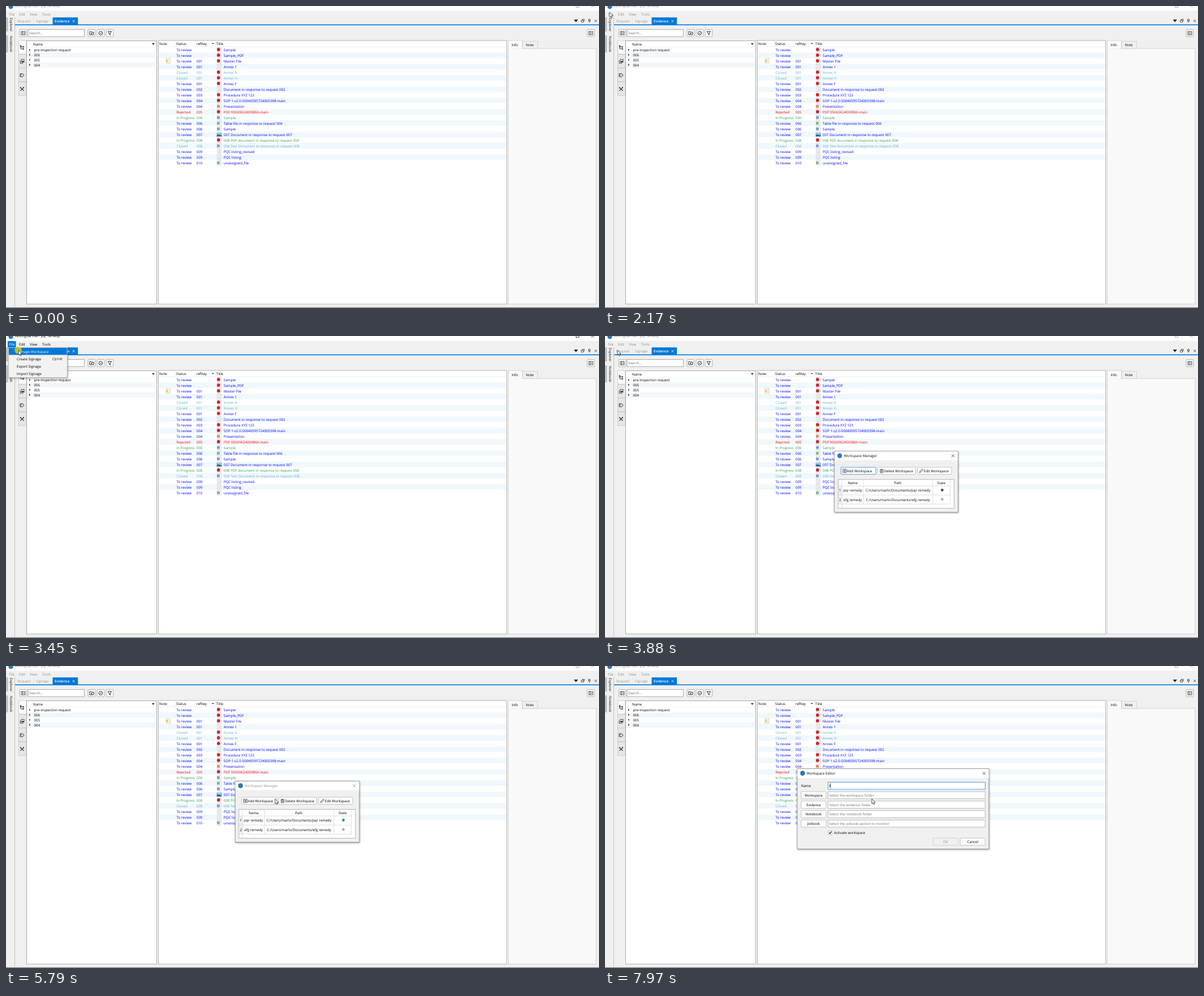
An HTML page that plays this animation: 1049x534 px, repeating every 8000 ms.

```html
<!DOCTYPE html>
<html lang="en">
<head>
<meta charset="utf-8">
<title>Workspace demo</title>
<style>
html, body { margin: 0; width: 100%; height: 100%; overflow: hidden; background: #f0f0f0; }
svg { display: block; }
text { font: 6.2px "Open Sans", "Noto Sans", sans-serif; white-space: pre; text-rendering: geometricPrecision; }
.chrome { fill: #8f8f8f; stroke: #8f8f8f; }
.active .chrome { fill: #000; stroke: #000; }
text.chrome { stroke: none !important; }
.dialog { transform-box: fill-box; transform-origin: center; }
</style>
</head>
<body>
<svg id="stage" width="1049" height="534" viewBox="0 0 1049 534"></svg>
<script>
const LOOP = 8000, BLUE = '#0078d7', STRIPE = '#f0f8fd';

// Markup helpers; text is placed by its vertical centre.
const text = (x, y, s, fill = '#000', attrs = '') =>
  `<text x="${x}" y="${y + 2.3}" fill="${fill}" ${attrs}>${s}</text>`;
const centred = (x, y, s, fill) => text(x, y, s, fill, 'text-anchor="middle"');
const rect = (x, y, w, h, fill, stroke = 'none', attrs = '') =>
  `<rect x="${x}" y="${y}" width="${w}" height="${h}" fill="${fill}" stroke="${stroke}" stroke-width=".7" ${attrs}/>`;
const line = (d, stroke = '#222', width = .8, attrs = '') =>
  `<path d="${d}" fill="none" stroke="${stroke}" stroke-width="${width}" ${attrs}/>`;
const solid = (d, fill = '#222') => `<path d="${d}" fill="${fill}"/>`;
const dot = (x, y, r, fill, attrs = '') => `<circle cx="${x}" cy="${y}" r="${r}" fill="${fill}" ${attrs}/>`;
const group = (id, body, attrs = '') => `<g id="${id}" ${attrs}>${body}</g>`;
const at = (x, y, body) => `<g transform="translate(${x} ${y})">${body}</g>`;
const cross = (x, y, r, color = '#222') =>
  line(`M${x - r} ${y - r}l${2 * r} ${2 * r}m0 ${-2 * r}l${-2 * r} ${2 * r}`, color, .8);
const button = (x, y, w, h, stroke = '#b0b0b0', fill = '#fcfcfc', attrs = '') =>
  rect(x, y, w, h, fill, stroke, 'rx="1" ' + attrs);

// Small icons, drawn around 0,0
const icons = {
  panel: rect(-3.5, -3, 7, 6, 'none', '#111') + line('M-1.2-3V3M2.3-1.4L.7 0 2.3 1.4', '#111', .8),
  folder: line('M-3.5 2.8V-2.8H-1L0-1.8H3.5V2.8Z', '#111', .9) + line('M-1.3.5H1.3M0-.8V1.8', '#111'),
  check: dot(0, 0, 3.3, 'none', 'stroke="#111" stroke-width=".9"') + line('M-1.5 0L-.3 1.2 1.7-1.2', '#111'),
  funnel: line('M-3.3-3H3.3L.8.3V3.2L-.8 2V.3Z', '#111', .9),
  tree: line('M-2.5-3.5V2.5H1M-2.5-.8H1', '#222', .9) + rect(1, -2, 2.3, 2, '#222') + rect(1, 1.5, 2.3, 2, '#222') + rect(-3.7, -3.7, 2.4, 2, '#222'),
  stack: rect(-1.5, -3.5, 5, 5, 'none', '#222') + line('M-3.3-1.5V3.5H2') + rect(-.5, -.5, 3.5, 1.7, '#222'),
  tag: line('M-3.3-2.5H.8L3.6 0 .8 2.7H-3.3Z', '#222', 1) + dot(-1.6, 0, .7, '#222'),
  tools: line('M-3-3L3 3M3-3L-3 3', '#222', 1.1) + dot(-2.6, -2.3, 1, '#222') + dot(2.5, -2.5, 1, '#222'),
  add: rect(-3, -3, 6, 6, 'none', '#222') + line('M-2 0H2M0-2V2'),
  bin: line('M-3-2H3M-1-3H1M-2.2-2V3.2H2.2V-2M-1-.4L1 1.6M1-.4L-1 1.6', '#222', .8),
  pen: line('M-3 3L-2.3.8 1.8-3.2 3.2-1.8-.9 2.3Z'),
};
const icon = (name, x, y) => at(x, y, icons[name]);

function fileIcon(kind, y) {
  const fills = { slides: '#e08a66', doc: '#7d9bd0', sheet: '#7fb48c' };
  const page = rect(-3.2, -4, 6.8, 8, '#fafafa', '#c9c9c9');
  if (kind === 'pdf') return at(377, y, page + dot(-1, -.3, 2.9, '#d3222a'));
  if (kind === 'image') return at(377, y, rect(-4, -3, 8.5, 6.5, '#9fd3f2', '#7a9bb5') + solid('M-4 3.3V.6L-1-.4 4.4 1.6V3.3Z', '#2d6a94'));
  if (kind === 'plain') return at(377, y, page + line('M-2-2H2.4M-2-.4H2.4M-2 1.2H2.4M-2 2.6H2.4', '#c2c8ce', .6));
  return at(377, y, page + rect(-3.7, -2.3, 4.8, 4.8, fills[kind]));
}

const STATUS = {
  R: ['To review', '#0000ff'],
  C: ['Closed', '#67b0bd'],
  P: ['In Progress', '#339b4b'],
  X: ['Rejected', '#ff0000'],
};
const FILES = [
  'R||pdf|Sample', 'R||pdf|Sample_PDF', 'R|001|pdf|Master File', 'R|001|plain|Annex 1',
  'C|001|pdf|Annex A', 'C|001|pdf|Annex H', 'R|001|pdf|Annex F',
  'R|002|plain|Document in response to request 002', 'R|003|pdf|Procedure XYZ 123',
  'R|004|pdf|SOP 1-s2.0-S0040595724000398-main', 'R|004|slides|Presentation',
  'X|005|pdf|PDF 9506962400086X-main', 'P|006|doc|Sample',
  'R|006|sheet|Table file in response to request 006', 'R|006|doc|Sample',
  'R|007|image|007 Document in response to request 007',
  'P|008|pdf|008 PDF document in response to request 008',
  'C|008|doc|008 Text Document in response to request 008',
  'R|009|plain|PQC listing_revised', 'R|009|plain|PQC listing', 'R|010|sheet|unassigned_file',
];

function fileRow(entry, i) {
  const [code, key, kind, title] = entry.split('|'), [status, color] = STATUS[code], y = 77.2 + 10 * i;
  return (i % 2 ? rect(270, y - 5, 615, 10, STRIPE) : '') +
    text(301.5, y, status, color) + text(337, y, key, color) + fileIcon(kind, y) + text(385, y, title, color);
}

function mainWindow() {
  const menu = [[5.5, 'File'], [23, 'Edit'], [42, 'View'], [64, 'Tools']];
  const side = [[21, 25, 'Explorer'], [53, 30, 'Notebook']];
  const tree = ['pre-inspection request', '006', '005', '004'];
  const tools = ['tree', 'stack', 'tag', 'tools'];
  const heads = [[271, 'Note'], [301, 'Status'], [337, 'refKey'], [372, 'Title']];
  return rect(0, 0, 1049, 534, '#f0f0f0') + rect(0, 0, 1049, 8.5, '#fff') +
    dot(8.5, 1, 4.2, '#2d76b5') + text(15.5, 0, 'VettingBarrow - pqr remedy', '', 'class="chrome"') +
    line('M1008.5-2V2.5H1013.5V-2M1035 2.5L1040-2.5M1040 2.5L1035-2.5', '', .7, 'class="chrome" style="fill:none"') +
    menu.map(([x, s]) => text(x, 14.5, s, '', 'class="chrome"')).join('') +
    side.map(([y, h, s]) => rect(0, y - 1, 3.5, h, '#bdbdbd') +
      `<text transform="translate(7 ${y}) rotate(90)" fill="#111">${s}</text>`).join('') +
    line('M15.5 20V532', '#b5b5b5', .8) +
    text(20, 27, 'Request', '#9a9a9a') + text(53, 27, 'Signage', '#9a9a9a') +
    line('M48.5 21V32M81.5 21V32', '#dedede', .6) +
    rect(82.6, 20.2, 44.6, 13, BLUE) + text(86, 26.8, 'Evidence', '#fff', 'style="font-weight:600"') + cross(119.5, 26.8, 1.9, '#fff') +
    rect(16, 32.5, 1033, 1.6, BLUE) +
    solid('M1004.5 24H1012L1008.2 28.5Z') + rect(1019.5, 23.5, 3.5, 3, 'none', '#222') + rect(1017.7, 25.3, 3.8, 3.2, '#f0f0f0', '#222') +
    line('M1030 26.5H1034M1030.7 26.5V23.5H1033.4V26.5M1032 26.5V29.5') + cross(1043.3, 26.3, 2) +
    [['panel', 30.5], ['folder', 151.5], ['check', 167.5], ['funnel', 183.5], ['panel', 1034.5]]
      .map(([n, x]) => button(x - 6.3, 41.5, 12.6, 12.6, '#949494') + icon(n, x, 48)).join('') +
    rect(39, 41.5, 99.5, 12.5, '#fff', '#8a8a8a') + text(41, 48, 'Search...', '#707070') +
    tools.map((n, i) => rect(22.5, 61 + 24.4 * i, 13.5, 24, i ? '#e6e6e6' : '#fafafa', '#c0c0c0') + icon(n, 28.5, 73.3 + 24.5 * i)).join('') +
    rect(36.4, 61.5, 229.8, 465.5, '#fff', '#8a8a8a') + text(48, 68, 'Name') + solid('M258 65.7H263L260.5 68.7Z') +
    line('M37 73H266', '#ececec', .6) +
    tree.map((s, i) => {
      const y = 78 + 8.8 * i;
      return (i % 2 ? rect(37, y - 4.4, 229, 8.8, STRIPE) : '') + solid(`M41 ${y - 2.3}L43.4 ${y - .4} 41 ${y + 1.5}Z`, '#333') + text(49.5, y, s);
    }).join('') +
    rect(269.5, 61, 616.3, 466, '#fff', '#969696') + heads.map(([x, s]) => text(x, 67, s)).join('') +
    line('M299.5 61V72M335 61V72M370.5 61V72M270 72H885.5', '#e2e2e2', .6) + solid('M364 67L366 65 368 67Z') +
    FILES.map(fileRow).join('') +
    at(286.5, 97, rect(-3.2, -4, 7, 8, '#fdf6e3', '#d3c296') + rect(-3.6, -1.6, 3.8, 3.8, '#ebc778')) +
    rect(888.4, 75, 155.6, 452, '#f9f9f9', '#c0c0c0') +
    rect(914, 62.5, 26.5, 12.5, '#f0f0f0', '#c8c8c8') + rect(888.4, 61, 25, 14.5, '#f9f9f9', '#c8c8c8') +
    rect(888.9, 74.3, 24, 1.5, '#f9f9f9') + text(894.5, 68.6, 'Info') + text(919.5, 69, 'Note') +
    rect(0, 532.8, 1049, 1.2, '#777');
}

function fileMenu() {
  const items = ['Manage Workspace', 'Create Signage', 'Export Signage', 'Import Signage'];
  return rect(3, 9, 14.5, 11, BLUE) + text(5.5, 14.5, 'File', '#fff') +
    rect(4.3, 20.3, 104, 53, '#f2f2f2', '#a5a5a5', 'filter="url(#shadow)"') +
    group('hover', rect(5, 21, 102.7, 12.4, BLUE)) +
    items.map((s, i) => text(19, 27.2 + 13.3 * i, s, '#000', i ? '' : 'id="firstItem"')).join('') + text(82, 40.5, 'Ctrl+R');
}

const frame = (x, y, w, h, title, barHeight, titleId) =>
  rect(x, y, w, h, '#f0f0f0', '#777', 'filter="url(#shadow)"') + rect(x + .4, y + .4, w - .8, barHeight, '#fff') +
  dot(x + 9.5, y + 8, 4.3, '#2d76b5') + text(x + 16.8, y + 8.2, title, '#000', `id="${titleId}"`);

function manager() {
  const rows = ['pqr remedy', 'efg remedy'];
  const buttons = [[417, 62, 'add', 'Add'], [482.5, 67, 'bin', 'Delete'], [553, 60.5, 'pen', 'Edit']];
  return frame(405.3, 203.6, 219.7, 108, 'Workspace Manager', 15.5, 'managerTitle') + group('managerClose', cross(616, 211.7, 2.6)) +
    buttons.map(([x, w, n, s], i) => button(x, 232, w, 12.6, '#b0b0b0', '#fcfcfc', i ? '' : 'id="addButton"') +
      icon(n, x + 6.5, 238.5) + text(x + (n === 'pen' ? 11 : 10.5), 238.5, s + ' Workspace')).join('') +
    rect(412, 253.5, 206, 51, '#fff', '#9a9a9a') + rect(412.4, 265, 6.3, 32, '#f0f0f0') +
    line('M412 265.2H611M412 281.2H611M412 297.2H611M418.7 254V304.5M457 254V297M580 254V297M611 254V297', '#cfcfcf', .7) +
    centred(438, 259.6, 'Name') + centred(518, 259.6, 'Path') + centred(595.5, 259.6, 'State') +
    rows.map((s, i) => {
      const y = 273 + 16.4 * i;
      return text(413.7, y, i + 1) + centred(437.8, y, s) + centred(518.3, y, 'C:/Users/marlo/Documents/' + s) +
        dot(596.8, y - .5, 2.4, '#a9a9a9', i ? 'stroke="#d8d8d8"' : 'id="state"');
    }).join('');
}

function editor() {
  const fields = [['Workspace', 'workspace folder'], ['Evidence', 'evidence folder'],
    ['Notebook', 'notebook folder'], ['Jotbook', 'jotbook section to monitor']];
  return frame(340, 181.6, 339, 142, 'Workspace Editor', 16, 'editorTitle') + cross(670.5, 189.7, 2.5) +
    text(347, 212, 'Name') + rect(394.7, 205.4, 277.7, 12.6, '#fff', BLUE) +
    fields.map(([name, hint], i) => {
      const y = 228.5 + 16.7 * i;
      return button(347, y - 6.4, 44, 12.8) + centred(369, y, name) +
        rect(394.7, y - 6.3, 277.7, 12.6, '#fff', '#a0a0a0') + text(396.5, y, 'Select the ' + hint, '#707070');
    }).join('') +
    rect(395, 291.2, 6.8, 6.8, '#fff', '#b4b4b4') + line('M396.3 294.6L397.8 296.3 400.6 292.6', '#111', 1.1) + text(405, 294.9, 'Activate workspace') +
    button(580.3, 304.3, 44.5, 12.8, '#c4c4c4', '#f0f0f0') + centred(602.5, 310.8, 'OK', '#8a8a8a') +
    button(628.3, 304.3, 44.2, 12.8) + centred(650.4, 310.8, 'Cancel') +
    text(396.2, 212, 't', '#000', 'id="typed"') + rect(0, 207.2, .8, 8.8, '#000', 'none', 'id="caret"');
}

const stage = document.getElementById('stage');
stage.innerHTML =
  '<defs><filter id="shadow" x="-10%" y="-10%" width="120%" height="125%"><feDropShadow dx=".8" dy="1.4" stdDeviation="1.6" flood-opacity=".35"/></filter></defs>' +
  mainWindow() + group('menu', fileMenu()) + group('manager', manager(), 'class="dialog"') + group('editor', editor(), 'class="dialog"') +
  group('pointer', dot(-.5, 0, 6.3, '#e6d800', 'id="click" opacity=".75"') +
    '<path d="M0 0V8.6L2 6.9 3.4 10 4.8 9.4 3.5 6.4H6.2Z" fill="#fff" stroke="#111" stroke-width=".7"/>');
const $ = id => document.getElementById(id);

// Pointer path: time, x, y
const PATH = [
  [670, 965, 494], [900, 606, 312], [1150, 333, 174], [1430, 128, 66], [1780, 40, 18], [2000, 10, 5],
  [2140, 8, 11], [2900, 9, 12], [3260, 22, 25], [3900, 22, 25], [4180, 300, 160], [4450, 562, 288],
  [4520, 561, 287], [4940, 561, 287], [5200, 422, 238], [5320, 476, 235], [6320, 476, 235],
  [6340, 474, 235], [6540, 474, 235], [6680, 472, 235],
];
function pointerAt(time) {
  const t = 670 + Math.floor((time - 670) / 70) * 70;
  const i = PATH.findIndex(p => p[0] > t);
  if (i < 0) return PATH[PATH.length - 1].slice(1);
  const a = PATH[Math.max(i - 1, 0)], b = PATH[i];
  const k = Math.max(0, (t - a[0]) / (b[0] - a[0]));
  return [1, 2].map(n => a[n] + (b[n] - a[n]) * k);
}

const within = (t, ...spans) => spans.some(([from, to]) => t >= from && t < to);
const show = (id, on) => { $(id).style.display = on ? '' : 'none'; };
const latest = (t, steps) => steps.reduce((value, [from, next]) => t >= from ? next : value, [0, 1]);
function setOpening(id, t, steps) {
  const [opacity, scale] = latest(t, steps);
  show(id, opacity > 0);
  $(id).style.opacity = opacity;
  $(id).style.transform = scale === 1 ? 'none' : `scale(${scale})`;
}

function render(t) {
  stage.classList.toggle('active', within(t, [2390, 3650]));

  $('menu').style.opacity = latest(t, [[2390, [0]], [2460, [.5]], [2520, [1]], [3580, [0]]])[0];
  const hovered = t >= 3050;
  show('hover', hovered);
  $('firstItem').setAttribute('fill', hovered ? '#fff' : '#000');

  setOpening('manager', t, [[3730, [.4, .95]], [3800, [.8, .98]], [3880, [.97, .996]], [3960, [1, 1]]]);
  const blurred = t >= 5720;
  $('managerTitle').setAttribute('fill', blurred ? '#8f8f8f' : '#000');
  $('managerClose').style.opacity = blurred ? .5 : 1;
  $('addButton').setAttribute('stroke', blurred ? '#b0b0b0' : BLUE);
  $('state').setAttribute('fill', t < 3960 ? '#444' : '#2e9358');

  setOpening('editor', t, [[5870, [.5, .96]], [5950, [.9, .985]], [6040, [1, 1]]]);
  const typed = t >= 7970;
  show('typed', typed);
  show('caret', within(t, [6040, 6380], [6910, 7440], [7970, LOOP]));
  $('caret').setAttribute('x', typed ? 398.4 : 396.3);

  show('pointer', t >= 670);
  show('click', within(t, [2390, 2590], [3400, 3580], [5660, 5720]));
  $('pointer').setAttribute('transform', `translate(${pointerAt(t)})`);
}

const start = performance.now();
function tick() {
  render((performance.now() - start) % LOOP);
  requestAnimationFrame(tick);
}
tick();
</script>
</body>
</html>
```
